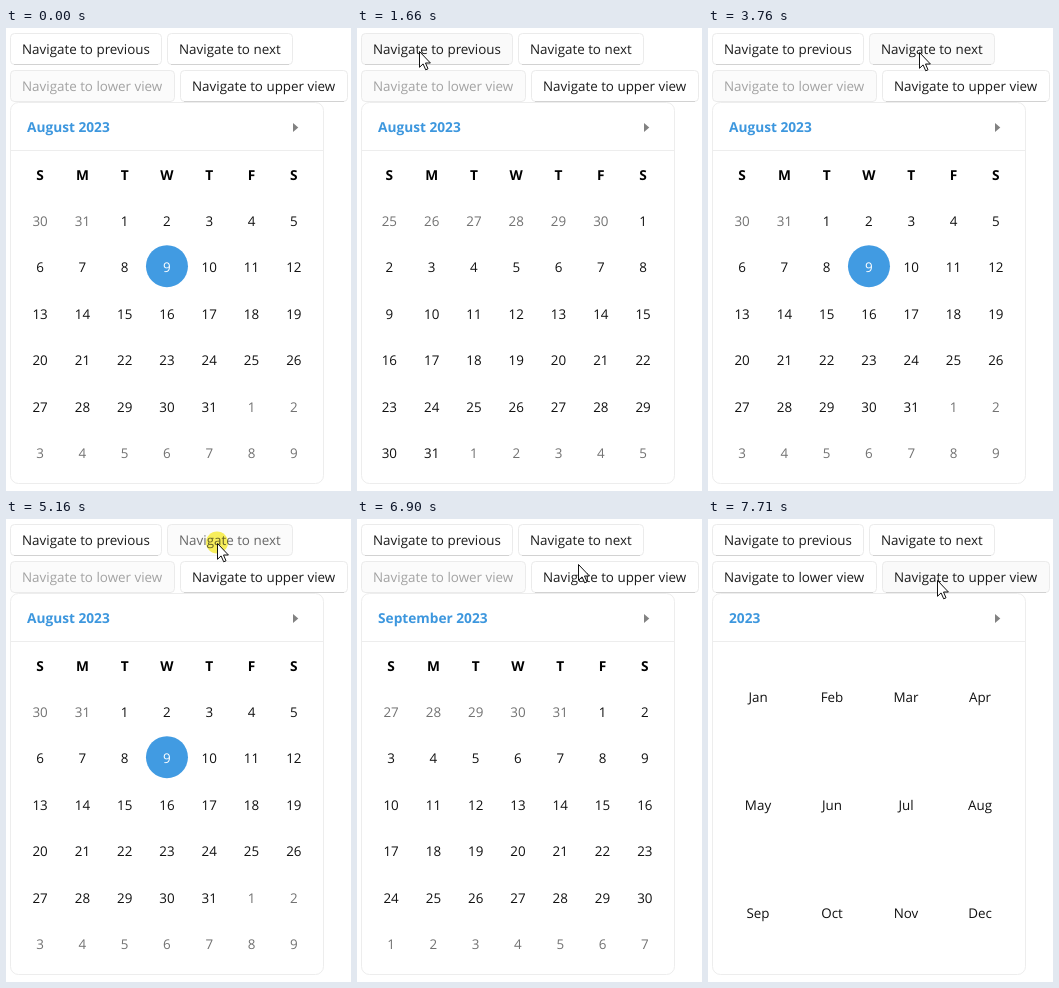
Animation of 345 by 463 pixels, one loop 8000 ms. Source, as an HTML page:

```html
<!DOCTYPE html>
<html lang="en">
<head>
<meta charset="utf-8">
<title>Calendar navigation</title>
<style>
  html, body { margin: 0; width: 100%; height: 100%; overflow: hidden; background: #fff; }
  svg { display: block; width: 345px; height: 463px; }
  text { font: 13.4px "Open Sans", "Noto Sans", sans-serif; fill: #111; text-rendering: geometricPrecision; }
  .bold { font-size: 13.7px; font-weight: 700; fill: #000; }
  .title { fill: #3d97de; }
  .mid { text-anchor: middle; }
  .other { fill: #727272; }
  .picked { fill: #fff; }
</style>
</head>
<body>
<svg id="stage" viewBox="0 0 345 463" xmlns="http://www.w3.org/2000/svg">
  <clipPath id="bodyClip"><rect x="13" y="124" width="296" height="326"/></clipPath>
  <g id="buttons"></g>
  <rect x="4.5" y="74.5" width="313" height="381" rx="8" fill="#fff" stroke="#ededed"/>
  <path d="M5 122.5H317" stroke="#ededed"/>
  <text id="title" class="bold title" x="21" y="104"></text>
  <path d="M287 95L292.3 99.5L287 104Z" fill="#828282"/>
  <g id="pages" clip-path="url(#bodyClip)"></g>
  <circle id="click" r="11" fill="#fbf25c" style="mix-blend-mode:multiply"/>
  <path id="cursor" d="M.5 .5V16.3L4.1 12.9L6.7 18.8L9 17.8L6.5 12H11.4Z" fill="#fff" stroke="#111"/>
</svg>
<script>
const LOOP = 8000, TICK = 70, PAGE_W = 296, SLIDE_MS = 250;
const $ = id => document.getElementById(id);

function add(parent, tag, attrs, text) {
  const el = document.createElementNS('http://www.w3.org/2000/svg', tag);
  for (const name in attrs) el.setAttribute(name, attrs[name]);
  if (text !== undefined) el.textContent = text;
  parent.appendChild(el);
  return el;
}

const clamp = v => Math.min(1, Math.max(0, v));
const progress = (t, start, ms) => clamp((t - start) / ms);
const quadOut = p => 1 - (1 - p) ** 2;
const inOut = p => (1 - Math.cos(Math.PI * p)) / 2;

// Buttons
function makeButton(x, y, w, label) {
  const g = add($('buttons'), 'g', {});
  const face = add(g, 'rect', { x: x + .5, y: y + .5, width: w, height: 31, rx: 4, stroke: '#ebebeb' });
  const edge = add(g, 'path', { d: `M${x + 4} ${y + 31.5}h${w - 7}`, stroke: '#d2d2d2' });
  const text = add(g, 'text', { x: x + 12, y: y + 21 }, label);
  return { x, y, w, face, edge, text };
}
const [previous, next, lower, upper] = [
  [4, 5, 151, 'Navigate to previous'],
  [161, 5, 125, 'Navigate to next'],
  [4, 42, 164, 'Navigate to lower view'],
  [174, 42, 167, 'Navigate to upper view']
].map(args => makeButton(...args));

const looks = {
  normal: ['#ffffff', '#d2d2d2', '#1b1b1b'],
  hover: ['#fafafa', '#d2d2d2', '#1b1b1b'],
  pressed: ['#fbfbfb', '#ebebeb', '#666666'],
  disabled: ['#fbfbfb', '#ebebeb', '#a2a2a2']
};
function setLook(button, look) {
  const [face, edge, text] = looks[look];
  button.face.setAttribute('fill', face);
  button.edge.setAttribute('stroke', edge);
  button.text.style.fill = text;
}

// Calendar pages
const columnX = i => 34.1 + i * PAGE_W / 7;

function monthPage(month) {
  const page = add($('pages'), 'g', {});
  [...'SMTWTFS'].forEach((d, i) => add(page, 'text', { class: 'mid bold', x: columnX(i), y: 152 }, d));
  const lead = new Date(Date.UTC(2023, month, 1)).getUTCDay();
  for (let i = 0; i < 42; i++) {
    const date = new Date(Date.UTC(2023, month, 1 - lead + i));
    const day = date.getUTCDate(), col = i % 7, row = Math.floor(i / 7);
    const inside = date.getUTCMonth() === month, picked = inside && month === 7 && day === 9;
    const x = columnX(col), y = 198 + row * 46.4;
    if (picked) add(page, 'circle', { cx: x, cy: y - 6.2, r: 21, fill: '#419be2' });
    add(page, 'text', { class: 'mid' + (picked ? ' picked' : inside ? '' : ' other'), x, y }, day);
  }
  return page;
}

function yearPage() {
  const page = add($('pages'), 'g', {});
  'Jan Feb Mar Apr May Jun Jul Aug Sep Oct Nov Dec'.split(' ').forEach((name, i) =>
    add(page, 'text', { class: 'mid', x: 50 + i % 4 * 74, y: 183 + Math.floor(i / 4) * 108 }, name));
  return page;
}

const july = monthPage(6), august = monthPage(7), september = monthPage(8), year = yearPage();
const pages = [july, august, september, year];

function place(page, x, opacity = 1) {
  page.style.display = opacity > 0 && Math.abs(x) < PAGE_W ? '' : 'none';
  page.setAttribute('transform', `translate(${x} 0)`);
  page.setAttribute('opacity', opacity);
}

// Timeline
const bursts = [0, 630, 1380, 2470, 3350, 5160, 6900, 7240];
const clicks = [[1380, 1450, previous], [3350, 3420, next], [5160, 5230, next], [7240, 7310, upper]];
const slides = [
  { start: 1455, from: august, to: july, dir: -1 },
  { start: 3375, from: july, to: august, dir: 1 },
  { start: 5180, from: august, to: september, dir: 1 }
];
const titles = [[0, 'August 2023'], [1790, 'July 2023'], [3760, 'August 2023'], [5580, 'September 2023'], [7590, '2023']];
const lastBefore = (list, t, key) => list.filter(item => key(item) <= t).pop();

function cursorAt(t) {
  if (t < 630) return [1, 429];
  if (t < 2400) {
    const e = quadOut(progress(t, 560, 620));
    return [62 * e, 114 - 91 * e];
  }
  if (t < 6830) {
    const e = inOut(progress(t, 2400, 490));
    return [62 + 149 * e, 23 + e + 8.5 * Math.sin(Math.PI * e)];
  }
  const e = quadOut(progress(t, 6830, 210));
  return [211 + 18 * e, 24 + 37 * e];
}

function drawPages(t) {
  pages.forEach(page => place(page, 0, 0));
  const slide = lastBefore(slides, t, s => s.start);
  if (!slide) return place(august, 0);
  const left = (1 - progress(t, slide.start, SLIDE_MS)) ** 3;
  const fade = progress(t, 7290, 300);
  place(slide.from, -slide.dir * (1 - left) * PAGE_W);
  place(slide.to, slide.dir * left * PAGE_W, 1 - fade);
  if (fade > 0) place(year, 0, fade);
}

function draw(time) {
  const start = lastBefore(bursts, time, b => b);
  const t = start + Math.floor((time - start) / TICK) * TICK;

  const [x, y] = cursorAt(t);
  const visible = time >= 630 || (time >= 180 && time < 240);
  $('cursor').style.display = visible ? '' : 'none';
  $('cursor').setAttribute('transform', `translate(${Math.round(x)} ${Math.round(y)})`);

  const click = clicks.find(([from, to]) => time >= from && time < to);
  $('click').style.display = click ? '' : 'none';
  $('click').setAttribute('cx', x);
  $('click').setAttribute('cy', y - .5);

  for (const b of [previous, next, lower, upper]) {
    const over = visible && x > b.x && x < b.x + b.w && y > b.y + 4 && y < b.y + 32;
    const off = b === lower && time < 7380;
    setLook(b, off ? 'disabled' : click && click[2] === b ? 'pressed' : over ? 'hover' : 'normal');
  }

  $('title').textContent = lastBefore(titles, time, item => item[0])[1];
  drawPages(t);
}

const origin = performance.now();
function frame() {
  draw((performance.now() - origin) % LOOP);
  requestAnimationFrame(frame);
}
draw(0);
requestAnimationFrame(frame);
</script>
</body>
</html>
```
